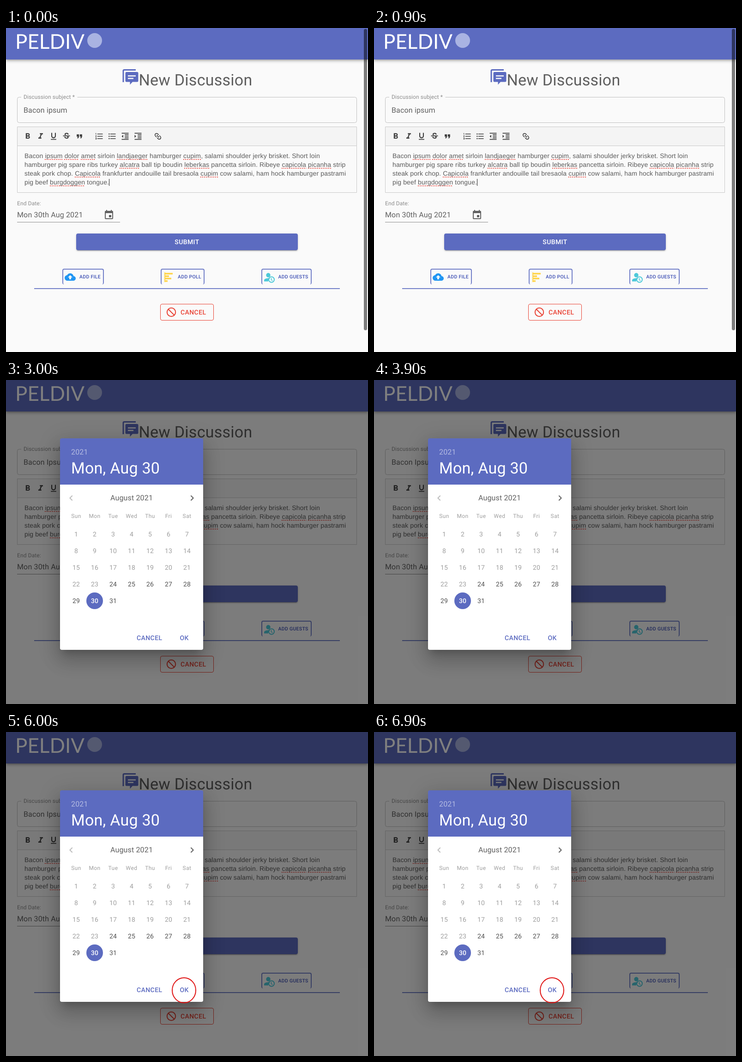
Write an HTML page that moves like this. It is 784x700 px and loops after 7500 ms.

```html
<!DOCTYPE html>
<html lang="en">
<head>
<meta charset="utf-8">
<title>New Discussion</title>
<style>
  :root { --indigo: #5c6bc0; --text: #5f5f5f; --red: #e94335; }
  html, body { margin: 0; width: 100%; height: 100%; overflow: hidden; }
  body { background: #fafafa; font-family: Roboto, sans-serif; text-rendering: geometricPrecision; }
  .stage { position: relative; width: 784px; height: 700px; overflow: hidden; }
  .stage div, .stage p, .stage svg { position: absolute; }
  svg { left: 0; top: 0; }
  text { font-size: 16px; letter-spacing: .00938em; fill: var(--text); }
  text.small { font-size: 12px; fill: #8c8c8c; }
  text.h4 { font-size: 34px; letter-spacing: .00735em; }
  text.btn { font-size: 14px; font-weight: 500; letter-spacing: .02857em; }
  text.tab { font-size: 10.5px; font-weight: 500; letter-spacing: .02857em; fill: #3f51b5; }
  text.mid { text-anchor: middle; }

  .bar { left: 0; top: 0; width: 784px; height: 68px; background: var(--indigo);
    box-shadow: 0 2px 4px -1px rgba(0,0,0,.2), 0 4px 5px rgba(0,0,0,.14), 0 1px 10px rgba(0,0,0,.12); }
  .submit { left: 152px; top: 444px; width: 480px; height: 36px; border-radius: 4px; background: var(--indigo);
    box-shadow: 0 3px 1px -2px rgba(0,0,0,.2), 0 2px 2px rgba(0,0,0,.14), 0 1px 5px rgba(0,0,0,.12); }
  .edge { top: 520px; height: 34px; box-sizing: border-box; border: 2px solid #7380c9; border-bottom: 0; border-radius: 4px; }
  .note { left: 40px; top: 267px; margin: 0; white-space: nowrap; color: #5a5a5a;
    font: 14px/19px "Liberation Sans", Arial, sans-serif; letter-spacing: .15px; }
  .note u { text-decoration: underline dotted #ec5a52 2px; text-underline-offset: 2px; text-decoration-skip-ink: none; }
  .caret { left: 223px; top: 326px; width: 1px; height: 15px; background: #222; }
  .scroll { left: 775px; top: 2px; width: 7px; height: 651px; border-radius: 4px; background: rgba(0,0,0,.5); }
  .veil { inset: 0; background: rgba(0,0,0,.5); }
  .dialog { left: 117px; top: 126px; width: 310px; height: 457px; border-radius: 4px;
    background: linear-gradient(var(--indigo) 100px, #fff 100px);
    box-shadow: 0 11px 15px -7px rgba(0,0,0,.2), 0 24px 38px 3px rgba(0,0,0,.14), 0 9px 46px 8px rgba(0,0,0,.12); }
  .ring { fill: none; stroke: #e01414; stroke-width: 2; }

  .form, .picker, .ring { animation: 7.5s step-end infinite; }
  .form { animation-name: form; }
  .picker { animation-name: picker; }
  .open-date { animation-name: openDate; }
  .pick-day { animation-name: pickDay; }
  .confirm { animation-name: confirm; }
  @keyframes form { 0% { visibility: visible } 40%, 100% { visibility: hidden } }
  @keyframes picker { 0% { visibility: hidden } 40%, 100% { visibility: visible } }
  @keyframes openDate { 0% { visibility: hidden } 20% { visibility: visible } 40%, 100% { visibility: hidden } }
  @keyframes pickDay { 0% { visibility: hidden } 60% { visibility: visible } 80%, 100% { visibility: hidden } }
  @keyframes confirm { 0% { visibility: hidden } 80%, 100% { visibility: visible } }
</style>
</head>
<body>
<div class="stage">
  <div class="bar"></div>
  <div class="submit"></div>
  <div class="edge" style="left:122px;width:90px"></div>
  <div class="edge" style="left:335px;width:95px"></div>
  <div class="edge" style="left:553px;width:109px"></div>

  <svg width="784" height="700">
    <!-- header -->
    <text x="20" y="45" style="font:44px Lato,sans-serif;letter-spacing:0;fill:#fff">PELDIV</text>
    <circle cx="192" cy="27" r="16" fill="#a9b3e2"/>

    <!-- title -->
    <g fill="none" stroke="#5c6bc0" stroke-width="3">
      <path d="M281 90.500H256q-2 0-2 2V117"/>
      <path d="M261 95h23q2.500 0 2.500 2.500V114q0 2.500-2.500 2.500h-10l-5.500 6v-6H261q-2.500 0-2.500-2.500V97.500q0-2.500 2.500-2.500z" fill="#5c6bc0" stroke="none"/>
      <path d="M264 103.500h17M264 109h12" stroke="#fafafa" stroke-width="2.500"/>
    </g>
    <text class="h4" x="287.500" y="124">New Discussion</text>

    <!-- subject -->
    <path d="M33 149.500H28.500a4 4 0 0 0-4 4V200.500a4 4 0 0 0 4 4H755.500a4 4 0 0 0 4-4V153.500a4 4 0 0 0-4-4H154.500" fill="none" stroke="#c0c0c0"/>
    <text class="small" x="38" y="153">Discussion subject *</text>
    <text class="form" x="38" y="183">Bacon ipsum</text>
    <text class="picker" x="38" y="183">Bacon Ipsum</text>

    <!-- editor -->
    <path d="M24.500 213.500h735v41h-735z" fill="#f4f4f4" stroke="#c9c9c9"/>
    <path d="M24.500 254.500v101h735v-101" fill="none" stroke="#c9c9c9"/>
    <g id="tools" fill="#3c3c3c"></g>

    <!-- date -->
    <text class="small" x="24" y="383">End Date:</text>
    <text x="24" y="409">Mon 30th Aug 2021</text>
    <path d="M24 419.500h223" stroke="#8c8c8c"/>
    <path transform="translate(211 392)" fill="#626262" d="M17 12h-5v5h5v-5zM16 1v2H8V1H6v2H5c-1.110 0-1.990.9-1.990 2L3 19c0 1.100.89 2 2 2h14c1.100 0 2-.9 2-2V5c0-1.100-.9-2-2-2h-1V1h-2zm3 18H5V8h14v11z"/>

    <text class="btn mid" x="392" y="467" style="fill:#fff">SUBMIT</text>

    <!-- extras -->
    <path d="M61 563h662" stroke="#7380c9" stroke-width="2"/>
    <path transform="translate(127 526)" fill="#2196f3" d="M19.350 10.040C18.670 6.590 15.640 4 12 4 9.110 4 6.600 5.640 5.350 8.040 2.340 8.360 0 10.910 0 14c0 3.310 2.690 6 6 6h13c2.760 0 5-2.240 5-5 0-2.640-2.050-4.780-4.650-4.960zM14 13v4h-4v-4H7l5-5 5 5h-3z"/>
    <path fill="#ffd54f" d="M343 528h2v21h-2zM345 529h16v3.500h-16zM345 534.500h8v3.500h-8zM345 539.500h13v3.500h-13zM345 545h5v3.500h-5z"/>
    <g fill="#4dc9d9">
      <circle cx="568" cy="534" r="4.700"/>
      <path d="M559 547.500v-2.500q0-4 9-4.500q3 0 4 1q-4 2-4 6z"/>
      <circle cx="575" cy="543.500" r="6" fill="none" stroke="#4dc9d9" stroke-width="2"/>
      <path d="M574.500 540v4l3 2" fill="none" stroke="#4dc9d9" stroke-width="1.500"/>
    </g>
    <text class="tab" x="159" y="541.300">ADD FILE</text>
    <text class="tab" x="372" y="541.300">ADD POLL</text>
    <text class="tab" x="589.500" y="541.300">ADD GUESTS</text>

    <!-- cancel -->
    <g fill="none" stroke="#e94335">
      <rect x="334.500" y="596.500" width="115" height="35" rx="3.500"/>
      <circle cx="358" cy="614" r="9.200" stroke-width="2"/>
      <path d="M351.500 607.500l13 13" stroke-width="2"/>
    </g>
    <text class="btn" x="378" y="619" style="fill:var(--red)">CANCEL</text>

    <ellipse class="ring open-date" cx="222.500" cy="403.500" rx="24.500" ry="23.500"/>
  </svg>

  <p class="note">Bacon <u>ipsum</u> <u>dolor</u> <u>amet</u> sirloin <u>landjaeger</u> hamburger <u>cupim</u>, salami shoulder jerky brisket. Short loin<br>hamburger pig spare ribs turkey <u>alcatra</u> ball tip boudin <u>leberkas</u> pancetta sirloin. Ribeye <u>capicola</u> <u>picanha</u> strip<br>steak pork chop. <u>Capicola</u> frankfurter andouille tail bresaola <u>cupim</u> cow salami, ham hock hamburger pastrami<br>pig beef <u>burgdoggen</u> tongue.</p>
  <div class="caret"></div>
  <div class="scroll form"></div>

  <div class="veil picker"></div>
  <div class="dialog picker"></div>
  <svg width="784" height="700">
    <g class="picker">
      <text x="141" y="161" style="fill:rgba(255,255,255,.54)">2021</text>
      <text class="h4" x="141" y="202" style="fill:#fff">Mon, Aug 30</text>
      <text class="mid" x="272" y="260">August 2021</text>
      <path transform="translate(129 243)" fill="#bdbdbd" d="M15.410 7.410L14 6l-6 6 6 6 1.410-1.410L10.830 12z"/>
      <path transform="translate(391 243)" fill="#626262" d="M10 6L8.590 7.410 13.170 12l-4.580 4.590L10 18l6-6z"/>
      <circle cx="192" cy="477" r="18" fill="#5c6bc0"/>
      <g id="days"></g>
      <text class="btn" x="283" y="562" style="fill:var(--indigo)">CANCEL</text>
      <text class="btn" x="376.500" y="562" style="fill:var(--indigo)">OK</text>
    </g>
    <ellipse class="ring pick-day" cx="191.500" cy="478" rx="25.500" ry="27"/>
    <ellipse class="ring confirm" cx="385.500" cy="558" rx="25.500" ry="27"/>
  </svg>
</div>

<script>
  const add = (parent, tag, attrs, label = '') => {
    const el = document.createElementNS('http://www.w3.org/2000/svg', tag);
    for (const key in attrs) el.setAttribute(key, attrs[key]);
    el.textContent = label;
    parent.append(el);
  };

  // Toolbar icons: centre x and a path on a 24 unit grid
  const lines = 'M11 17h10v-2H11zM3 21h18v-2H3zM3 3v2h18V3zM11 9h10V7H11zM11 13h10v-2H11z';
  const rows = 'M7 5v2h14V5zM7 19h14v-2H7zM7 13h14v-2H7z';
  const dot = y => `M2.5 ${y}a1.5 1.5 0 1 0 3 0a1.5 1.5 0 1 0-3 0z`;
  const icons = [
    [47, 'M15.6 10.79c.97-.67 1.65-1.77 1.65-2.79 0-2.26-1.75-4-4-4H7v14h7.04c2.09 0 3.71-1.7 3.71-3.79 0-1.52-.86-2.82-2.15-3.42zM10 6.5h3c.83 0 1.5.67 1.5 1.5s-.67 1.5-1.5 1.5h-3v-3zm3.5 9H10v-3h3.5c.83 0 1.5.67 1.5 1.5s-.67 1.5-1.5 1.5z'],
    [75, 'M10 4v3h2.21l-3.42 8H6v3h8v-3h-2.21l3.42-8H18V4z'],
    [103, 'M12 17c3.31 0 6-2.69 6-6V3h-2.5v8c0 1.93-1.57 3.5-3.5 3.5S8.5 12.93 8.5 11V3H6v8c0 3.31 2.69 6 6 6zm-7 2v2h14v-2H5z'],
    [131, 'M6.85 7.08C6.85 4.37 9.45 3 12.24 3c1.64 0 3 .49 3.9 1.28.77.65 1.46 1.73 1.46 3.24h-3.01c0-.31-.05-.59-.15-.85-.29-.86-1.2-1.28-2.25-1.28-1.86 0-2.34 1.02-2.34 1.7 0 .48.25.88.74 1.21.38.25.77.48 1.41.7H7.39c-.21-.34-.54-.89-.54-1.92zM21 12v-2H3v2h9.62c1.15.45 1.96.75 1.96 1.97 0 1-.81 1.67-2.28 1.67-1.54 0-2.93-.54-2.93-2.51H6.4c0 .55.08 1.13.24 1.58.81 2.29 3.29 3.3 5.67 3.3 2.27 0 5.3-.89 5.3-4.05 0-.3-.01-1.16-.48-1.94H21z'],
    [159, 'M6 17h3l2-4V7H5v6h3zm8 0h3l2-4V7h-6v6h3z'],
    [202, 'M2 17h2v.5H3v1h1v.5H2v1h3v-4H2zm1-9h1V4H2v1h1zm-1 3h1.8L2 13.1v.9h3v-1H3.2L5 10.9V10H2z' + rows],
    [230, dot(6) + dot(12) + dot(18) + rows],
    [258, 'M3 12l4 4V8z' + lines],
    [286, 'M3 8v8l4-4z' + lines],
    [329, 'M3.9 12c0-1.71 1.39-3.1 3.1-3.1h4V7H7c-2.76 0-5 2.24-5 5s2.24 5 5 5h4v-1.9H7c-1.71 0-3.1-1.39-3.1-3.1zM8 13h8v-2H8zm9-6h-4v1.9h4c1.71 0 3.1 1.39 3.1 3.1s-1.39 3.1-3.1 3.1h-4V17h4c2.76 0 5-2.24 5-5s-2.24-5-5-5z', 45]
  ];
  for (const [x, d, turn = 0] of icons)
    add(tools, 'path', { d, transform: `translate(${x} 234) rotate(${turn}) scale(.833) translate(-12 -12)` });

  // Calendar
  const column = i => 152 + 40 * i;
  ['Sun', 'Mon', 'Tue', 'Wed', 'Thu', 'Fri', 'Sat'].forEach((name, i) =>
    add(days, 'text', { class: 'mid', x: column(i), y: 298, style: 'font-size:12px;letter-spacing:.0333em;fill:#9e9e9e' }, name));
  for (let day = 1; day <= 31; day++) {
    const i = day - 1;
    const fill = day === 30 ? '#fff' : day < 24 ? '#9e9e9e' : '#4f4f4f';
    add(days, 'text', {
      class: 'mid', x: column(i % 7), y: 338 + 36 * Math.floor(i / 7),
      style: `font-size:14px;letter-spacing:.0107em;fill:${fill};font-weight:${day === 30 ? 500 : 400}`
    }, day);
  }
</script>
</body>
</html>
```
